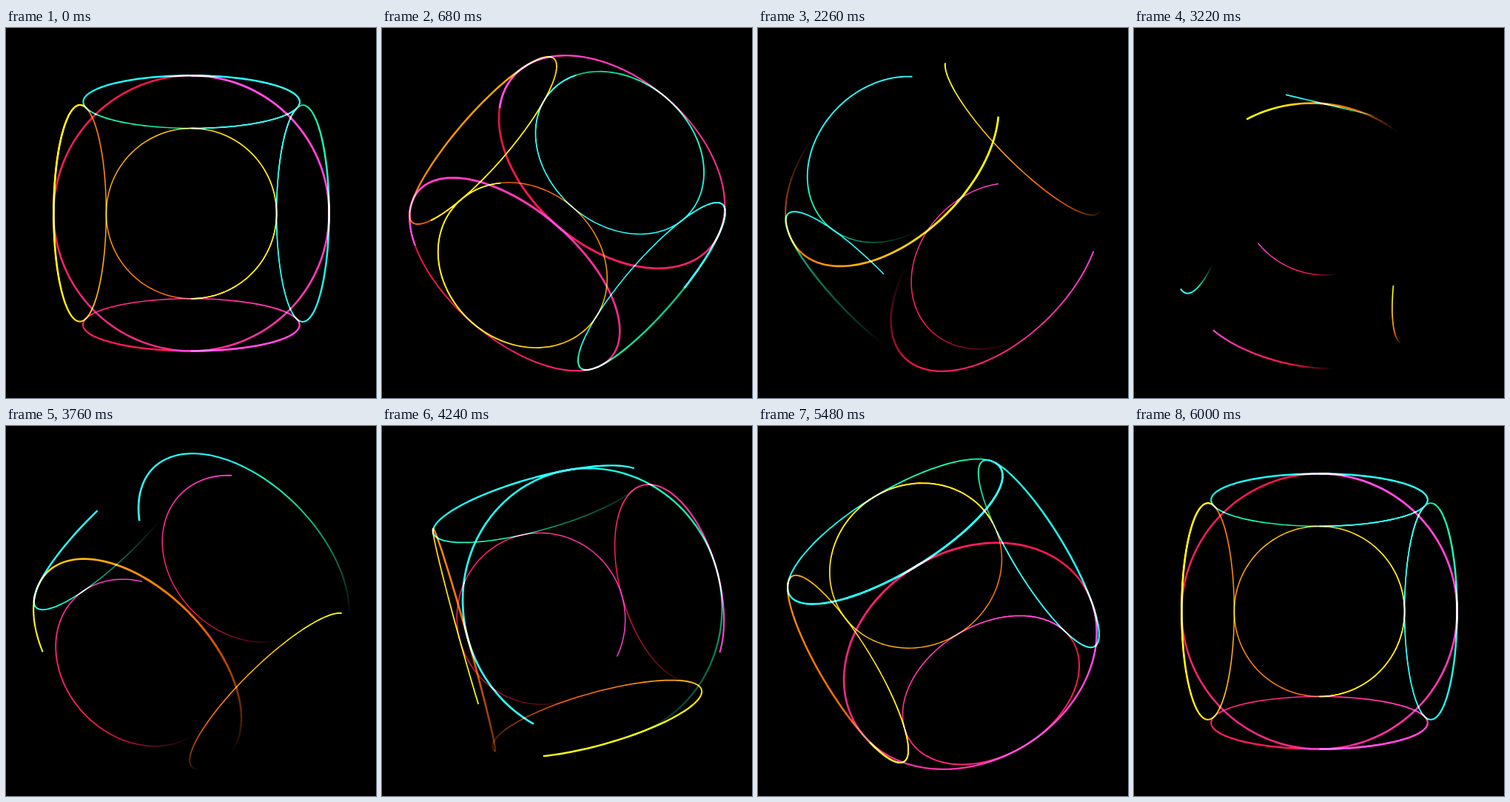
These frames come from a looping animation (500 px wide and 500 px high, 6.02 s). An HTML page with a canvas:

```html
<!DOCTYPE html>
<html lang="en">
<head>
<meta charset="utf-8">
<title>Six orbits</title>
<style>
  html, body { margin: 0; width: 100%; height: 100%; overflow: hidden; background: #000; }
  canvas { display: block; width: 500px; height: 500px; }
</style>
</head>
<body>
<canvas id="stage" width="500" height="500"></canvas>
<script>
const ctx = document.getElementById('stage').getContext('2d');
const LOOP = 6020, TURN = 6000;
const CENTER = 250.5, CAMERA = 4.24, FOCAL = 603;
const LINE = 0.0135;
const MAX_TRAIL = 3 * Math.PI;

// Colour gains above 1 saturate, so a fading trail shifts in hue.
const CYAN = [0.2, 2.5, 1.7], YELLOW = [3, 1.2, 0.05], PINK = [3, 0.25, 0.85];

// One circle on each cube face, given by the cosine and sine of its phase.
const orbits = [
  { color: CYAN,   at: (c, s) => [1, -c, s] },
  { color: YELLOW, at: (c, s) => [-1, -c, -s] },
  { color: PINK,   at: (c, s) => [-s, 1, c] },
  { color: CYAN,   at: (c, s) => [-s, -1, -c] },
  { color: PINK,   at: (c, s) => [-s, -c, 1] },
  { color: YELLOW, at: (c, s) => [-s, c, -1] }
];

// Rotates about x, then about z, and projects with perspective.
function project([x, y, z], cos, sin) {
  const y1 = cos * y - sin * z;
  const depth = sin * y + cos * z;
  const scale = FOCAL / (CAMERA - depth);
  return {
    x: CENTER + scale * (cos * x - sin * y1),
    y: CENTER + scale * (sin * x + cos * y1),
    scale
  };
}

function shade(gains, level) {
  const [r, g, b] = gains.map(gain => Math.round(255 * Math.min(1, gain * level)));
  return `rgb(${r},${g},${b})`;
}

function drawTrail({ color, at }, turn, length) {
  const cos = Math.cos(turn), sin = Math.sin(turn);
  const head = 3 * turn;
  const steps = Math.max(24, Math.ceil(length / 0.04));
  const point = i => {
    const phase = head - length * i / steps;
    return project(at(Math.cos(phase), Math.sin(phase)), cos, sin);
  };
  let from = point(0);
  for (let i = 1; i <= steps; i++) {
    const to = point(i);
    ctx.strokeStyle = shade(color, 1 - (i - 0.5) / steps);
    ctx.lineWidth = LINE * (from.scale + to.scale) / 2;
    ctx.beginPath();
    ctx.moveTo(from.x, from.y);
    ctx.lineTo(to.x, to.y);
    ctx.stroke();
    from = to;
  }
}

function draw(time) {
  const turn = 2 * Math.PI * Math.min(time / TURN, 1);
  const length = MAX_TRAIL * Math.abs(Math.cos(turn / 2));
  ctx.globalCompositeOperation = 'source-over';
  ctx.fillStyle = '#000';
  ctx.fillRect(0, 0, 500, 500);
  ctx.globalCompositeOperation = 'lighter';
  if (length > 1e-4) orbits.forEach(orbit => drawTrail(orbit, turn, length));
}

const start = performance.now();
function tick() {
  draw((performance.now() - start) % LOOP);
  requestAnimationFrame(tick);
}
tick();
</script>
</body>
</html>
```
